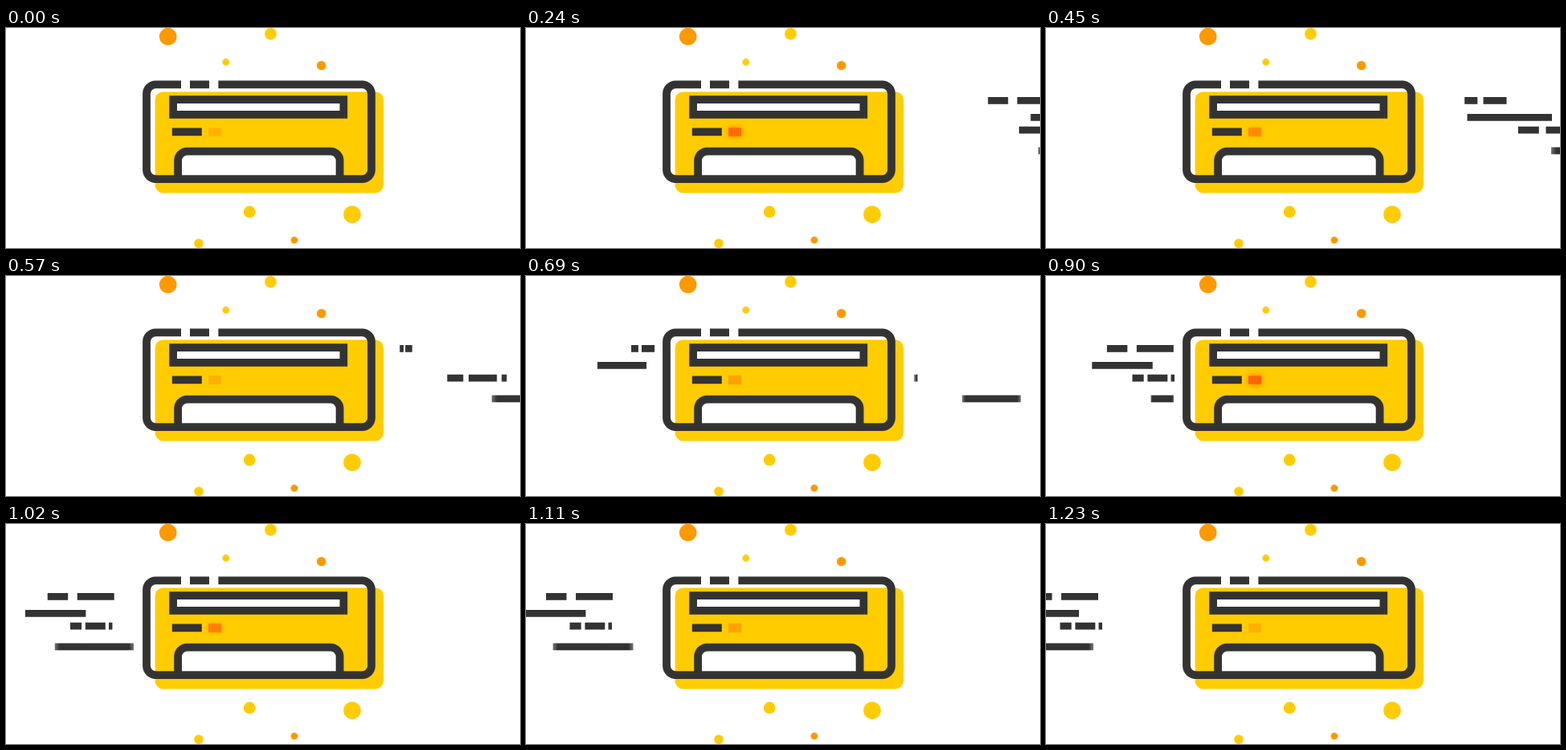
These frames come from a looping animation (640x274 px, 1260 ms). An HTML page with a canvas:

```html
<!DOCTYPE html>
<html lang="en">
<head>
<meta charset="utf-8">
<title>Air conditioner</title>
<style>
  html, body { margin: 0; width: 100%; height: 100%; overflow: hidden; background: #fff; }
  canvas { display: block; }
</style>
</head>
<body>
<canvas id="stage" width="640" height="274"></canvas>
<script>
const ctx = document.getElementById('stage').getContext('2d');
const LOOP = 1260, STEP = 30, INLET = 480;
const DARK = '#333', YELLOW = '#fc0', ORANGE = '#f90';

// Air streaks. head and tail: [distance to the inlet, easing power], both reach it at `gone`.
// A streak grows out of `port` between `born` and `free`, then glides [distance, easing power].
const pair = [[0, .307], [.446, 1]], bar = [[0, 1]], triple = [[0, .27], [.36, .835], [.915, 1]];
const streaks = [
  { y: 86, dashes: pair, width: 83, head: [157, 1], tail: [213, 1.9], gone: 610,
    port: 160, born: 660, free: 885, glide: [95, 1.41] },
  { y: 107, dashes: bar, width: 75.5, head: [267, 1], tail: [356, 3], gone: 540,
    port: 150, born: 581, free: 838, glide: [109, 1] },
  { y: 122.7, dashes: triple, width: 52.5, head: [137, 3.56], tail: [232, 4.86], gone: 695,
    port: 160, born: 740, free: 900, glide: [90, 1.17] },
  { y: 148.5, dashes: bar, width: 100, head: [158, 5.5], tail: [260, 8], gone: 757,
    port: 159, born: 880, free: 1069, glide: [100, 1], fade: .06 }
];

function box(x, y, w, h, color, r = 0) {
  ctx.fillStyle = color;
  ctx.beginPath();
  ctx.roundRect(x, y, w, h, r);
  ctx.fill();
}

function drawStreak({ y, dashes, fade }, left, right) {
  const width = right - left;
  let color = DARK;
  if (fade) {
    color = ctx.createLinearGradient(left, 0, right, 0);
    color.addColorStop(0, '#777');
    color.addColorStop(fade, DARK);
    color.addColorStop(1 - fade, DARK);
    color.addColorStop(1, '#777');
  }
  for (const [from, to] of dashes) box(left + from * width, y, (to - from) * width, 8.8, color);
}

function intake(streak, t) {
  if (t >= streak.gone) return;
  const entry = 30 * Math.max(0, 1 - t / 200) ** 2;
  const edge = ([distance, power]) => INLET + entry + distance * (1 - (t / streak.gone) ** power);
  drawStreak(streak, edge(streak.head), edge(streak.tail));
}

function outlet(streak, t) {
  const { width, port, born, free, glide: [distance, power] } = streak;
  if (t <= born) return;
  const grown = 1 - Math.max(0, (free - t) / (free - born)) ** 3;
  const right = port - distance * Math.max(0, (t - free) / (LOOP - STEP - free)) ** power;
  drawStreak(streak, right - width * grown, right);
}

// The lower dots mirror the upper ones.
function drawDots() {
  const dot = (x, y, r, color) => box(x - r, y - r, 2 * r, 2 * r, color, r);
  for (const [x, y, r, upper, lower] of [
    [201.7, 10.6, 10.8, ORANGE, YELLOW],
    [329.5, 7.3, 7.4, YELLOW, YELLOW],
    [273.8, 42.5, 4.4, YELLOW, ORANGE],
    [392.7, 46.7, 5.8, ORANGE, YELLOW]
  ]) {
    dot(x, y, r, upper);
    dot(632.7 - x, y + 221.6, r, lower);
  }
}

function drawLamp(t) {
  const glow = .5 - .5 * Math.cos(t * Math.PI / 300);
  const color = `rgb(255, ${Math.round(178 - 76 * glow)}, 0)`;
  ctx.save();
  ctx.shadowColor = color;
  ctx.shadowBlur = 7 * glow;
  box(252, 124.3, 16, 10.4, color);
  ctx.restore();
}

function drawUnit(t) {
  box(185.6, 79.4, 284.4, 126.1, YELLOW, 10);

  ctx.strokeStyle = DARK;
  ctx.lineWidth = 9.8;
  ctx.fillStyle = '#fff';
  ctx.beginPath();
  ctx.moveTo(214.1, 188);
  ctx.arcTo(214.1, 153.7, 226, 153.7, 11.5);
  ctx.arcTo(415.6, 153.7, 415.6, 165, 11.5);
  ctx.lineTo(415.6, 188);
  ctx.fill();
  ctx.stroke();

  ctx.beginPath();
  ctx.roundRect(175, 70.4, 280, 117.7, 11.5);
  ctx.stroke();
  box(218, 64, 11, 12.5, '#fff');
  box(253, 64, 11.4, 12.5, '#fff');

  box(203.2, 84.2, 222, 28.5, DARK);
  box(213, 94, 202.5, 9, '#fff');
  box(206.8, 124.4, 37, 9.8, DARK);
  drawLamp(t);
}

function draw(now) {
  const t = Math.floor(now % LOOP / STEP) * STEP;
  box(0, 0, 640, 274, '#fff');
  drawDots();
  for (const streak of streaks) {
    intake(streak, t);
    outlet(streak, t);
  }
  drawUnit(t);
}

const start = performance.now();
function tick() {
  draw(performance.now() - start);
  requestAnimationFrame(tick);
}
tick();
</script>
</body>
</html>
```
